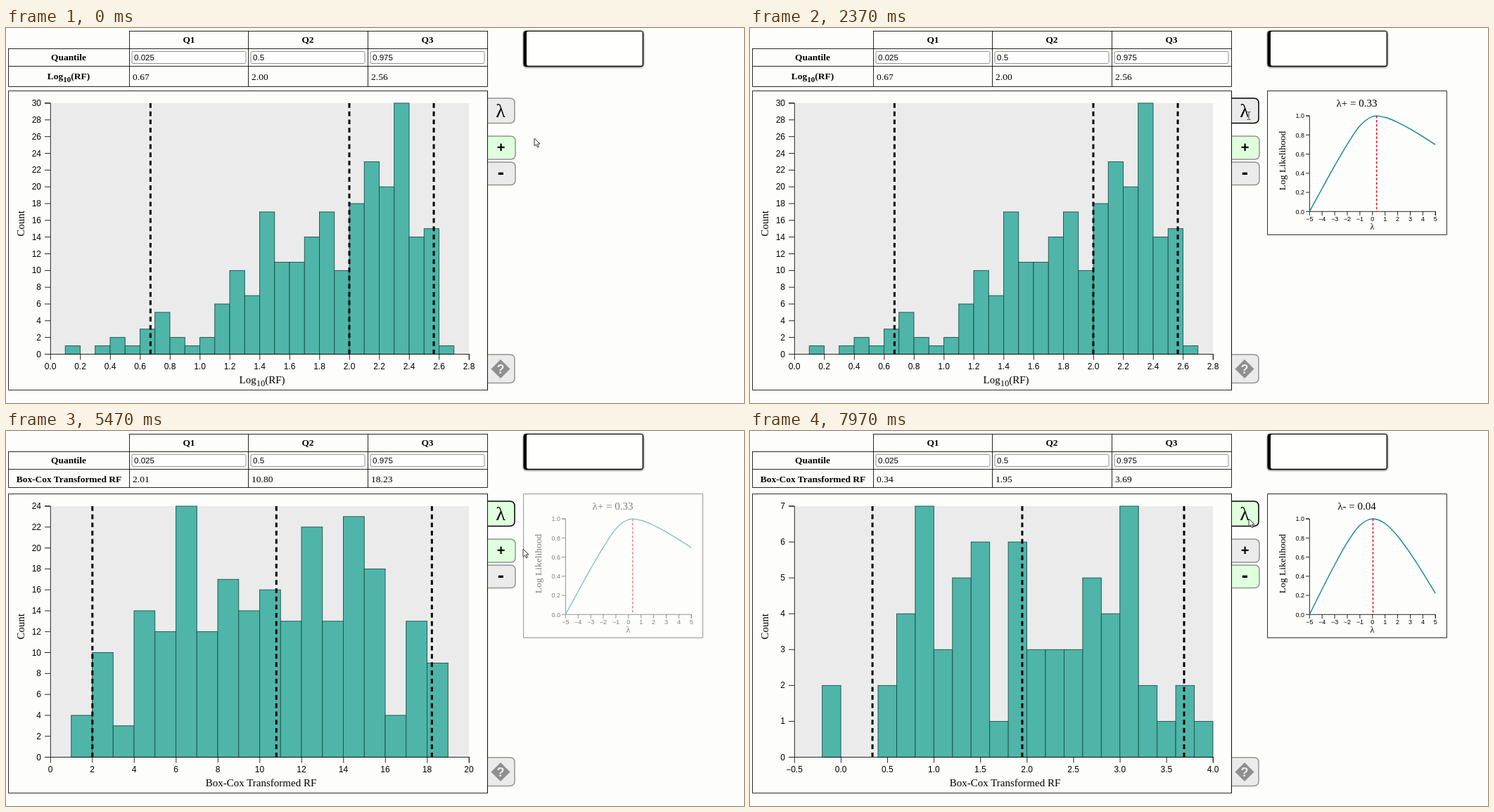
These frames come from a looping animation (1049x534 px, 8000 ms). An HTML page:

```html
<!DOCTYPE html>
<html lang="en">
<head>
<meta charset="utf-8">
<title>Histogram explorer</title>
<style>
  html, body { margin: 0; width: 100%; height: 100%; overflow: hidden; background: #fdfdfb; }
  svg { display: block; }
  text { font-family: "Liberation Serif", "Times New Roman", serif; font-size: 15px; text-anchor: middle; }
  .sans { font-family: "Liberation Sans", Arial, sans-serif; font-size: 12px; }
  .small { font-size: 9px; }
  .end { text-anchor: end; }
  .cell { font-size: 13.5px; text-anchor: start; }
  .head { font-size: 13.45px; font-weight: bold; }
  .input { font-size: 11.6px; text-anchor: start; }
  .line { fill: none; stroke: #000; stroke-width: .85; }
  .bar { fill: #4eb5a8; stroke: #1f4f49; stroke-width: .9; }
  .quantile { stroke: #000; stroke-width: 3; stroke-dasharray: 6.7 5; }
  .curve { fill: none; stroke: #118880; stroke-width: 1.4; }
  .best { stroke: #e01228; stroke-width: 1.5; stroke-dasharray: 3.4 2.5; }
</style>
</head>
<body>
<svg id="stage" width="1049" height="534" viewBox="0 0 1049 534">
  <defs><filter id="glow" x="-10%" y="-30%" width="120%" height="160%"><feGaussianBlur stdDeviation="1.7"/></filter></defs>
</svg>
<script>
const LOOP = 8000;
const stage = document.getElementById('stage');

function el(tag, attrs, parent = stage, text) {
  const node = document.createElementNS('http://www.w3.org/2000/svg', tag);
  for (const k in attrs) node.setAttribute(k, attrs[k]);
  if (text !== undefined) node.textContent = text;
  parent.append(node);
  return node;
}
const group = (parent = stage) => el('g', {}, parent);
const label = (parent, x, y, text, cls = '', more = {}) =>
  el('text', { x, y, class: cls, ...more }, parent, text);
const path = (parent, d, cls = 'line') => el('path', { d, class: cls }, parent);
const num = (v, digits) => v.toFixed(digits).replace('-', '\u2212');

function logLabel(parent, x, y, cls, sub) {
  const t = label(parent, x, y, '', cls);
  el('tspan', {}, t, 'Log');
  el('tspan', { dy: 4, style: `font-size:${sub}px` }, t, '10');
  el('tspan', { dy: -4 }, t, '(RF)');
}

const BOX_COX = 'Box-Cox Transformed RF';
const views = [
  { min: 0, max: 2.8, step: 0.2, digits: 1, top: 30, yStep: 2, from: 0.1, bin: 0.1,
    counts: [1,0,1,2,1,3,5,2,1,2,6,10,7,17,11,11,14,17,10,18,23,20,30,14,15,1],
    lines: [0.67, 2, 2.565], values: ['0.67', '2.00', '2.56'], log: true },
  { min: 0, max: 20, step: 2, digits: 0, top: 24, yStep: 2, from: 1, bin: 1,
    counts: [4,10,3,14,12,24,12,17,14,16,13,22,13,23,18,4,13,9],
    lines: [2.01, 10.8, 18.23], values: ['2.01', '10.80', '18.23'] },
  { min: -0.5, max: 4, step: 0.5, digits: 1, top: 7, yStep: 1, from: -0.2, bin: 0.2,
    counts: [2,0,0,2,4,7,3,5,6,1,6,3,3,3,5,4,7,2,1,2,1],
    lines: [0.34, 1.95, 3.69], values: ['0.34', '1.95', '3.69'] }
];

// Shared table and frames
const cols = [175.5, 344.5, 514.5];
cols.forEach((x, i) => {
  label(stage, x + 84.5, 21, 'Q' + (i + 1), 'head');
  el('rect', { x: x + 3.5, y: 33.5, width: 162, height: 17, rx: 2, fill: '#fff', stroke: '#808080', 'stroke-width': 0.85 });
  label(stage, x + 6.5, 46, ['0.025', '0.5', '0.975'][i], 'sans input');
});
label(stage, 89, 46, 'Quantile', 'head');
path(stage, 'M175.5 4.5H684.5M3.5 29.5H684.5M3.5 54.5H684.5');
path(stage, 'M3.5 89.6H684.5V515.6H3.5Z');
el('rect', { x: 63, y: 107, width: 595, height: 357, fill: '#ebebeb' });
label(stage, 0, 0, 'Count', '', { transform: 'translate(26 278.5) rotate(-90)' });

function buildView(v) {
  const g = group();
  const px = x => 63 + (x - v.min) / (v.max - v.min) * 595;
  const py = y => 464.5 - y / v.top * 357.5;
  const bottom = v.log ? 83.5 : 80.5;
  path(g, `M3.5 29V${bottom}H684.5M175.5 4V${bottom}M344.5 4V${bottom}M514.5 4V${bottom}M684.5 4V${bottom}`);
  if (v.log) {
    logLabel(g, 89, 72.5, 'head', 11);
    logLabel(g, 364, 505.5, '', 12.5);
  } else {
    label(g, 89.5, 72.5, BOX_COX, 'head');
    label(g, 362.5, 505.5, BOX_COX);
  }
  v.values.forEach((s, i) => label(g, cols[i] + 4.5, v.log ? 73.5 : 72.5, s, 'cell'));
  v.counts.forEach((c, i) => {
    if (!c) return;
    const x = px(v.from + i * v.bin);
    el('rect', { x, y: py(c), width: v.bin * 595 / (v.max - v.min), height: 464.5 - py(c), class: 'bar' }, g);
  });
  let axis = 'M55 107H63.3V464.5H658.3V472.5';
  for (let y = 0; y <= v.top; y += v.yStep) {
    axis += `M55 ${py(y)}H63`;
    label(g, 50, py(y) + 4, y, 'sans end');
  }
  const ticks = Math.round((v.max - v.min) / v.step);
  for (let i = 0; i <= ticks; i++) {
    const x = v.min + i * v.step;
    axis += `M${px(x) + 0.3} 464V472.5`;
    label(g, px(x), 486, num(x, v.digits), 'sans');
  }
  path(g, axis);
  v.lines.forEach(q => path(g, `M${px(q)} 107V464`, 'quantile'));
  return g;
}
const viewNodes = views.map(buildView);

// Empty tooltip box
el('rect', { x: 736, y: 4.5, width: 170, height: 51, rx: 4, filter: 'url(#glow)' });
el('rect', { x: 735.5, y: 4, width: 170.5, height: 51, rx: 4 });
el('rect', { x: 740, y: 5, width: 164.7, height: 48.8, rx: 2, fill: '#fffffd' });

// Side buttons
function button(y, bottom, right) {
  return el('path', {
    d: `M684.5 ${y}H${right - 7}q7 0 7 7V${bottom - 7}q0 7 -7 7H684.5`,
    fill: '#ebebeb', stroke: '#949494', 'stroke-width': 1.5
  });
}
const lambda = button(100, 135.5, 723);
const plus = button(154, 187, 724);
const minus = button(191, 223.5, 724);
button(465, 505.5, 723);
path(stage, 'M684.5 89.6V515.6');
label(stage, 703, 126.5, 'λ', '', { style: 'font-size:28px' });
label(stage, 703.5, 176.5, '+', 'sans', { style: 'font-size:20px;font-weight:bold' });
label(stage, 703.5, 215, '-', 'sans', { style: 'font-size:28px;font-weight:bold' });
path(stage, 'M703 472L716.5 485.5L703 499L689.5 485.5Z', '').setAttribute('fill', '#8f8f8f');
label(stage, 703, 492, '?', 'sans', { style: 'font-size:18px;font-weight:bold', fill: '#ebebeb' });

// Likelihood panel
const panel = group();
const lx = v => 884.8 + v * 17.9;
const ly = v => 261.3 - v * 136.2;
path(panel, 'M735.6 89.6H990.4V294.4H735.6Z');
label(panel, 0, 0, 'Log Likelihood', '', { transform: 'translate(761 189) rotate(-90)', style: 'font-size:13.5px' });
let axis = `M790 ${ly(1)}H795.4V${ly(0)}H974.3V267`;
for (let i = 0; i <= 5; i++) {
  axis += `M790 ${ly(i / 5)}H795`;
  label(panel, 788, ly(i / 5) + 3.2, (i / 5).toFixed(1), 'sans small end');
}
for (let i = -5; i <= 5; i++) {
  axis += `M${lx(i)} 261V267`;
  label(panel, lx(i), 275, num(i, 0), 'sans small');
}
path(panel, axis);
label(panel, 884.5, 287, 'λ', '', { style: 'font-size:12px' });

// Smooth curve through the likelihoods at λ = -5 … 5
function smooth(ys) {
  const last = ys.length - 1;
  const slope = i => (ys[Math.min(i + 1, last)] - ys[Math.max(i - 1, 0)]) / (i % last ? 2 : 1);
  let d = `M${lx(-5)} ${ly(ys[0])}`;
  for (let i = 0; i < last; i++) {
    const x = i - 5;
    d += `C${lx(x + 1 / 3)} ${ly(ys[i] + slope(i) / 3)} ${lx(x + 2 / 3)} ${ly(ys[i + 1] - slope(i + 1) / 3)} ${lx(x + 1)} ${ly(ys[i + 1])}`;
  }
  return d;
}

function fit(sign, best, ys) {
  const g = group(panel);
  label(g, 862.5, 112, `λ${sign} = ${best}`);
  path(g, smooth(ys), 'curve');
  path(g, `M${lx(best)} ${ly(1)}V${ly(0)}`, 'best');
  return g;
}
const fits = [
  fit('+', 0.33, [0, 0.241, 0.478, 0.703, 0.896, 0.993, 0.984, 0.932, 0.862, 0.783, 0.698]),
  fit('-', 0.04, [0, 0.265, 0.52, 0.753, 0.932, 1, 0.951, 0.819, 0.64, 0.437, 0.22])
];

// Pointers, hot spot at the origin
const arrow = el('path', {
  d: 'M0 0V11.2L2.6 8.8L4.5 12.8L6.3 12L4.5 8H8Z', fill: '#fff', stroke: '#333', 'stroke-width': 1
});
const beam = group();
const beamShape = 'M-2.5 -5.5H-.8L0 -4.7L.8 -5.5H2.5M0 -4.7V4.7M-2.5 5.5H-.8L0 4.7L.8 5.5H2.5';
el('path', { d: beamShape, fill: 'none', stroke: '#fff', 'stroke-width': 2.4 }, beam);
el('path', { d: beamShape, fill: 'none', stroke: '#222' }, beam);

const route = [
  [0, 751, 157], [350, 751, 157], [830, 725, 139], [1100, 709, 125], [4800, 709, 125],
  [5200, 729, 149], [5470, 735, 168], [6050, 711, 216], [6680, 711, 216], [7080, 709, 125], [LOOP, 709, 125]
];

const ramp = (t, a, b) => Math.min(1, Math.max(0, (t - a) / (b - a)));
const cubic = p => p < 0.5 ? 4 * p ** 3 : 1 - 4 * (1 - p) ** 3;
const within = (t, a, b) => t >= a && t < b;
const show = (node, on) => node.setAttribute('display', on ? 'inline' : 'none');

function pointerAt(t) {
  const i = route.findIndex(r => r[0] > t);
  const [t0, x0, y0] = route[i - 1], [t1, x1, y1] = route[i];
  const p = ramp(t, t0, t1), e = p * p * (3 - 2 * p);
  return [x0 + (x1 - x0) * e, y0 + (y1 - y0) * e];
}

function paint(node, green, hot) {
  const mix = (a, b) => Math.round(a + (b - a) * green);
  node.setAttribute('fill', `rgb(${mix(235, 223)},${mix(235, 255)},${mix(235, 221)})`);
  node.setAttribute('stroke', hot ? '#000' : '#949494');
}

function draw(t) {
  const view = t < 3000 ? 0 : t < 6450 ? 1 : 2;
  viewNodes.forEach((n, i) => show(n, i === view));
  fits.forEach((n, i) => show(n, i === (view === 2 ? 1 : 0)));

  const fade = s => cubic(ramp(t, s, s + 1000));
  panel.setAttribute('opacity', fade(860) - fade(4970) + fade(6950));

  const swap = cubic(ramp(t, 6600, 7150));
  paint(lambda, cubic(ramp(t, 3130, 3700)), within(t, 870, 5650) || t >= 6960);
  paint(plus, 1 - swap, false);
  paint(minus, swap, within(t, 5900, 6780));

  const [x, y] = pointerAt(t);
  const typing = within(t, 1060, 4860);
  show(arrow, !typing);
  show(beam, typing);
  (typing ? beam : arrow).setAttribute('transform', `translate(${x} ${y})`);
}

const start = performance.now();
function tick() {
  draw((performance.now() - start) % LOOP);
  requestAnimationFrame(tick);
}
tick();
</script>
</body>
</html>
```
